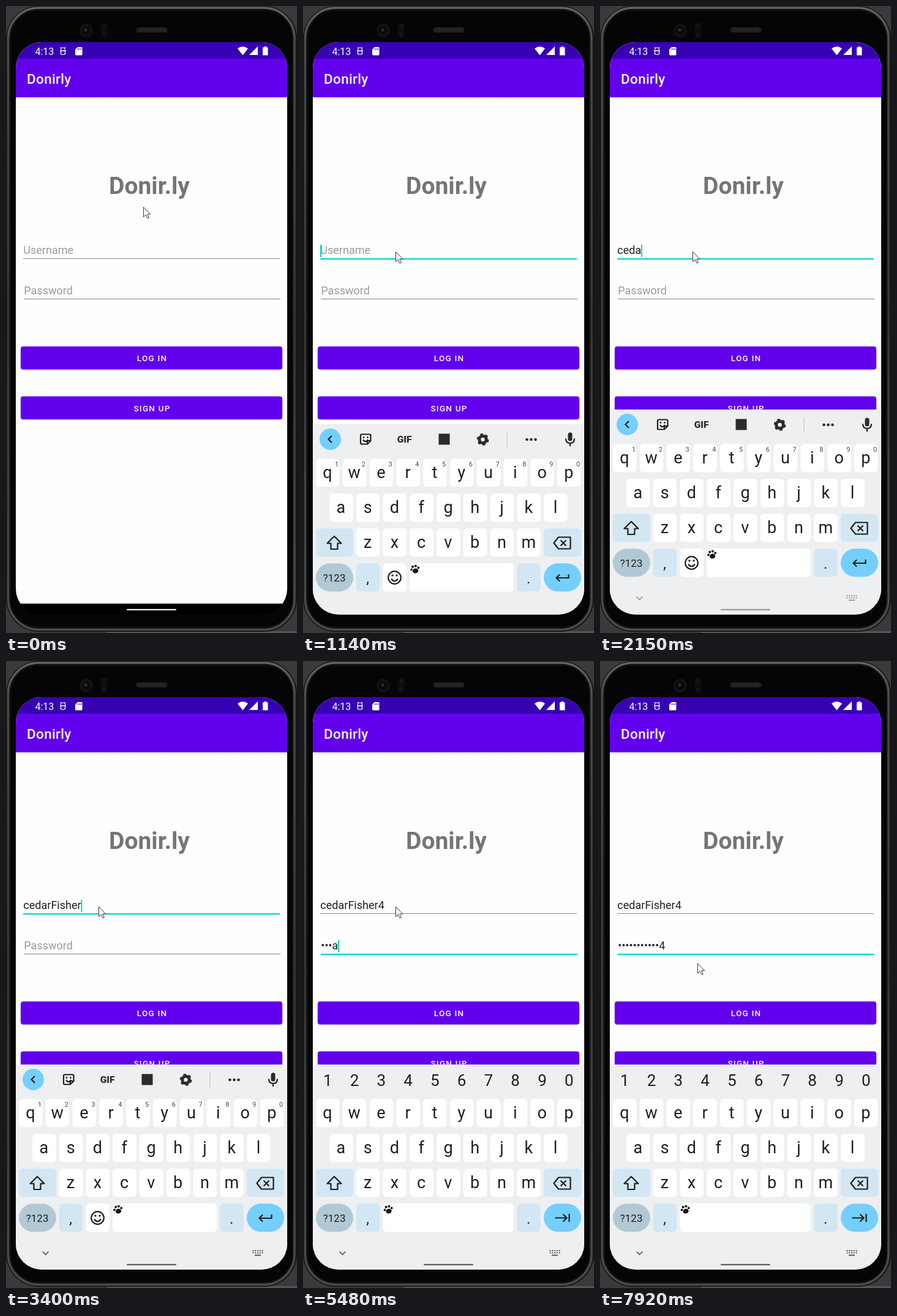
An HTML page that plays this animation: 475x1024 px, repeating every 8000 ms.

```html
<!DOCTYPE html>
<html lang="en">
<head>
<meta charset="utf-8">
<title>Sign-in demo</title>
<style>
  html, body { margin: 0; width: 100%; height: 100%; overflow: hidden; background: #3a3a3a; }
  svg { display: block; width: 475px; height: 1024px; font-family: Roboto, "Noto Sans", sans-serif; }
  text { white-space: pre; }
  .mid { text-anchor: middle; }
  .btn { fill: #fff; font-size: 13.5px; font-weight: 500; letter-spacing: 1.2px; }
  .field { font-size: 18.05px; }
  .key { font-size: 27px; fill: #1f1f1f; }
  .sup { font-size: 11px; fill: #4a4a4a; }
  .ink { fill: #2b2b2e; }
  .line { fill: none; stroke: #1f1f1f; stroke-width: 2.2; }
</style>
</head>
<body>
<svg viewBox="0 0 475 1024">
  <defs>
    <clipPath id="screen"><rect x="16" y="59" width="443" height="935" rx="42"/></clipPath>
    <linearGradient id="rim" x2="0" y2="1">
      <stop offset="0" stop-color="#626464"/><stop offset=".06" stop-color="#484a4a"/>
      <stop offset=".5" stop-color="#343636"/><stop offset="1" stop-color="#4a4c4c"/>
    </linearGradient>
    <linearGradient id="drop" x2="0" y2="1">
      <stop offset="0" stop-color="#000" stop-opacity=".14"/><stop offset="1" stop-color="#000" stop-opacity="0"/>
    </linearGradient>
  </defs>

  <!-- phone body -->
  <rect width="475" height="1024" fill="#3a3a3a"/>
  <rect x="165" y="1021" width="310" height="3" fill="#555"/>
  <rect x="0" y="0" width="475" height="1022" rx="54" fill="#151515"/>
  <rect x="3.500" y="3" width="467.500" height="1015.500" rx="50" fill="#0e0e0e" stroke="url(#rim)" stroke-width="3.500"/>
  <rect x="7" y="7" width="461" height="1008" rx="46" fill="#050505" stroke="#1a1a1a"/>
  <circle cx="131" cy="40" r="11" fill="#121212"/>
  <circle cx="131" cy="40" r="7" fill="#0a0a0a"/>
  <circle cx="130" cy="39" r="2.500" fill="#2e2e30"/>
  <rect x="154.500" y="27" width="11" height="25" rx="5" fill="#0d0d0d"/>
  <circle cx="160" cy="33" r="3" fill="#151515"/><circle cx="160" cy="46" r="3" fill="#151515"/>
  <rect x="213" y="35.500" width="50" height="7" rx="3.500" fill="#1a1a1a" stroke="#2c2c2c"/>
  <path d="M217 39H260" stroke="#343434" stroke-width="4" stroke-dasharray="1 1.500"/>

  <g clip-path="url(#screen)">
    <rect x="16" y="59" width="443" height="935" fill="#000"/>
    <rect x="16" y="59" width="443" height="917" fill="#fefefe"/>
    <rect x="16" y="149" width="443" height="5" fill="url(#drop)"/>
    <rect x="16" y="59" width="443" height="27" fill="#3700b3"/>
    <rect x="16" y="86" width="443" height="63" fill="#6200ee"/>
    <g fill="#fff">
      <text x="47.500" y="79.500" font-size="16">4:13</text>
      <path d="M89.500 73V71Q89.500 68 93 68T96.500 71V73ZM89.500 73V76.500Q90 79.500 93 79.500T96.500 76.500V73M88 73.500H98M89 67L90.500 69M97 67L95.500 69M88.500 78.500L90 77.500M97.500 78.500L96 77.500" fill="none" stroke="#fff" stroke-width="1.200"/>
      <path d="M117 67H123Q124.500 67 124.500 68.500V79Q124.500 80.500 123 80.500H114.500Q113 80.500 113 79V71Z"/>
      <path d="M117.500 69V72M120 69V72M122.500 69V72" stroke="#3700b3"/>
      <path d="M378 69.500Q386.500 63 395 69.500L386.500 80.500Z"/>
      <path d="M411 66V80H397Z"/>
      <path d="M421.500 66H425V67.500H427.500V80.500H419V67.500H421.500Z"/>
      <text x="34" y="126.700" font-size="22.560" font-weight="500" letter-spacing=".280">Donirly</text>
    </g>
    <text class="mid" x="234" y="307" font-size="39" font-weight="700" fill="#757575">Donir.ly</text>

    <g id="user"></g>
    <g id="pass"></g>
    <g id="buttons"></g>
    <rect x="197" y="984.700" width="81" height="2.300" rx="1.100" fill="#f4f4f4"/>

    <g id="board">
      <rect x="16" y="659" width="443" height="345" fill="#eeeff1"/>
      <g id="tools">
        <circle cx="44.500" cy="683.500" r="17.500" fill="#74cfff"/>
        <path class="line" d="M47 678L41.500 683.500L47 689"/>
        <path class="line" stroke-width="2" d="M96 675.500H108.500Q110.500 675.500 110.500 677.500V686L105 691.500H96Q94 691.500 94 689.500V677.500Q94 675.500 96 675.500ZM110 686H105V691M98 684.500Q102 690 106 684"/>
        <circle class="ink" cx="99" cy="680.500" r="1.400"/><circle class="ink" cx="105.500" cy="680.500" r="1.400"/>
        <text class="mid ink" x="165.500" y="689" font-size="15.500" font-weight="900">GIF</text>
        <rect class="ink" x="221.500" y="674.500" width="18" height="18"/>
        <circle cx="293.500" cy="684" r="5.700" fill="none" stroke="#2b2b2e" stroke-width="5"/>
        <circle cx="293.500" cy="684" r="8.600" fill="none" stroke="#2b2b2e" stroke-width="2.600" stroke-dasharray="4.500 4.500"/>
        <path d="M333 671.500V696.500" stroke="#c9cacc" stroke-width="1.300"/>
        <g class="ink"><circle cx="365.500" cy="684" r="2.300"/><circle cx="372.500" cy="684" r="2.300"/><circle cx="379.500" cy="684" r="2.300"/></g>
        <rect class="ink" x="432.500" y="672.500" width="7" height="14" rx="3.500"/>
        <path class="line" d="M429 682.500Q429 690 436 690T443 682.500M436 690V695"/>
      </g>
      <g id="digits"></g>
      <g id="keys"></g>
      <rect id="space" y="886" height="46.500" rx="6" fill="#fff"/>
      <g id="smile">
        <rect x="130.500" y="886" width="38.500" height="46.500" rx="6" fill="#fff"/>
        <circle class="line" cx="149.500" cy="909.500" r="10.300"/>
        <path class="line" d="M144 911.500Q149.500 919 155 911.500"/>
        <circle class="ink" cx="146" cy="906" r="1.700"/><circle class="ink" cx="153" cy="906" r="1.700"/>
      </g>
      <g id="paw" fill="#161616">
        <ellipse cx="0" cy="3.200" rx="4.700" ry="3.900"/>
        <circle cx="-5.800" cy="-.500" r="1.900"/><circle cx="-2.500" cy="-4.500" r="2"/>
        <circle cx="2.500" cy="-4.500" r="2"/><circle cx="5.900" cy="-.600" r="1.900"/>
      </g>
      <g class="line">
        <path d="M51 842L62.500 853.500H56.500V863H45.500V853.500H39.500Z" stroke-linejoin="round"/>
        <path d="M417 843.500H436.500V862.500H417L409.500 853Z" stroke-linejoin="round"/>
        <path d="M420.500 848.500L429.500 857.500M429.500 848.500L420.500 857.500"/>
        <path id="enter" d="M433.500 904V910H414M419 904.500L413.500 910L419 915.500"/>
        <path id="next" d="M411.500 909.500H430M424.500 903.500L430.500 909.500L424.500 915.500M434.500 903V916"/>
      </g>
    </g>
    <g id="nav">
      <path d="M59.500 964.500L64.500 969.500L69.500 964.500" fill="none" stroke="#56595c" stroke-width="1.700"/>
      <path d="M402.500 963H419.500M402.500 966.500H419.500" stroke="#56595c" stroke-width="2" stroke-dasharray="2 1.750"/>
      <path d="M406 970.500H416" stroke="#56595c" stroke-width="1.800"/>
      <rect x="197" y="984.700" width="81" height="2.300" rx="1.100" fill="#5c5e61"/>
    </g>
  </g>

  <path id="mouse" d="M.5 .5V16.500L4.200 13L7 19L9.300 18L6.800 12.100H11.700Z" fill="#fff" stroke="#222" stroke-width=".9" stroke-linejoin="round"/>
</svg>
<script>
const LOOP = 8000;
const NAME = 'cedarFisher4';
const $ = id => document.getElementById(id);

function add(parent, tag, attrs, text = '') {
  const el = document.createElementNS('http://www.w3.org/2000/svg', tag);
  for (const k in attrs) el.setAttribute(k, attrs[k]);
  el.textContent = text;
  parent.append(el);
  return el;
}
const show = (el, on) => { el.style.display = on ? '' : 'none'; };

// step tracks: [time, value...]
const MOUSE = [[0, 224, 328], [500, 204, 350], [620, 174, 389], [740, 159, 407], [890, 151, 401], [7800, 154, 452], [7920, 159, 493.5]];
const USER = [[0, 0], [1550, 1], [1910, 2], [2030, 3], [2150, 4], [2300, 5], [2540, 6], [2900, 7], [3150, 9], [3400, 11], [3970, 12]];
const PASS = [[0, 0], [4710, 1], [5110, 2], [5360, 3], [5480, 4], [5630, 5], [6000, 6], [6250, 7], [6500, 8], [6620, 10], [6740, 11], [7270, 12]];
const SLIDE = [[0, 400], [1140, 24], [1290, 2], [1410, 0]];
const FADE = [[0, 0], [1290, .06], [1410, .12], [1550, .2], [1670, .28], [1910, .42], [2030, .5], [2150, .58], [2300, .67], [2540, .82], [2660, .9], [2900, 1]];
const at = (track, t) => track.findLast(s => s[0] <= t).slice(1);

function makeField(id, x, y, hint) {
  const g = $(id);
  const rule = add(g, 'rect', { x, y, width: 419 });
  const text = add(g, 'text', { class: 'field', x: x + .3, y: y - 7.3 });
  const caret = add(g, 'rect', { y: y - 22, height: 20, fill: '#03dac5' });
  return (value, focus, blink, hintColor = '#9b9b9b') => {
    rule.setAttribute('height', focus ? 2.2 : 1);
    rule.setAttribute('fill', focus ? '#03d6c4' : '#858585');
    text.textContent = value || hint;
    text.setAttribute('fill', value ? '#212121' : hintColor);
    caret.setAttribute('x', value ? x + text.getComputedTextLength() : x);
    caret.setAttribute('width', value ? 2 : 2.5);
    show(caret, focus && blink);
  };
}
const drawUser = makeField('user', 28, 412, 'Username');
const drawPass = makeField('pass', 29, 478, 'Password');

for (const [label, y] of [['LOG IN', 556], ['SIGN UP', 637.5]]) {
  add($('buttons'), 'rect', { x: 23.5, y: y + 2, width: 428, height: 37.4, rx: 4.5, fill: '#000', opacity: .14 });
  add($('buttons'), 'rect', { x: 24, y, width: 427, height: 37.6, rx: 4, fill: '#6200ee' });
  add($('buttons'), 'text', { class: 'btn mid', x: 238.5, y: y + 24 }, label);
}

const PITCH = 43.78;
const keys = $('keys');
const sups = [];
function key(x, y, width, label, fill = '#fff', rx = 6, size = 27, dy = 32) {
  add(keys, 'rect', { x, y, width, height: 46, rx, fill });
  add(keys, 'text', { class: 'key mid', x: x + width / 2 - .4, y: y + dy, style: `font-size:${size}px` }, label);
}
[['qwertyuiop', 21, 715.3], ['asdfghjkl', 43, 772.3], ['zxcvbnm', 86.7, 829.3]].forEach(([row, x0, y], r) =>
  [...row].forEach((c, i) => {
    const x = x0 + i * PITCH;
    key(x, y, 38.5, c);
    if (r) return;
    const n = (i + 1) % 10;
    sups.push(add(keys, 'text', { class: 'sup mid', x: x + 34, y: y + 12.7 }, n));
    add($('digits'), 'text', { class: 'key mid', x: x + 19.2, y: 694, style: 'font-size:26px' }, n);
  }));
const PALE = '#d3e6f3', SKY = '#74cfff';
key(21, 829.3, 61, '', PALE);
key(393, 829.3, 61, '', PALE);
key(21, 886.3, 61, '?123', '#b1c9d5', 23, 17, 30);
key(86.7, 886.3, 38.5, ',', PALE, 6, 24, 33);
key(349.3, 886.3, 38.5, '.', PALE, 6, 24, 33);
key(393, 886.3, 61, '', SKY, 23);

function draw(t) {
  const [mx, my] = at(MOUSE, t);
  $('mouse').setAttribute('transform', `translate(${mx} ${my})`);

  const [n] = at(USER, t), [p] = at(PASS, t);
  const second = t >= 4220;
  drawUser(NAME.slice(0, n), t >= 1020 && !second, true, t >= 1020 && t < 1140 ? '#6f6f6f' : undefined);
  drawPass(p ? '•'.repeat(p - 1) + NAME[p - 1] : '', second, t >= 4340 && t < 7800);

  const [dy] = at(SLIDE, t);
  show($('board'), dy < 400);
  $('board').setAttribute('transform', `translate(0 ${dy})`);
  $('nav').setAttribute('opacity', at(FADE, t)[0]);

  const numeric = t >= 4340;
  show($('tools'), !numeric);
  show($('digits'), numeric);
  show($('smile'), !numeric);
  show($('enter'), !numeric);
  show($('next'), numeric);
  sups.forEach(s => show(s, !numeric));
  const left = numeric ? 130.5 : 174;
  $('space').setAttribute('x', left);
  $('space').setAttribute('width', 344 - left);
  $('paw').setAttribute('transform', `translate(${left + 8.7} 895.5) rotate(-15)`);
}

function tick() {
  draw(performance.now() % LOOP);
  requestAnimationFrame(tick);
}
tick();
</script>
</body>
</html>
```
